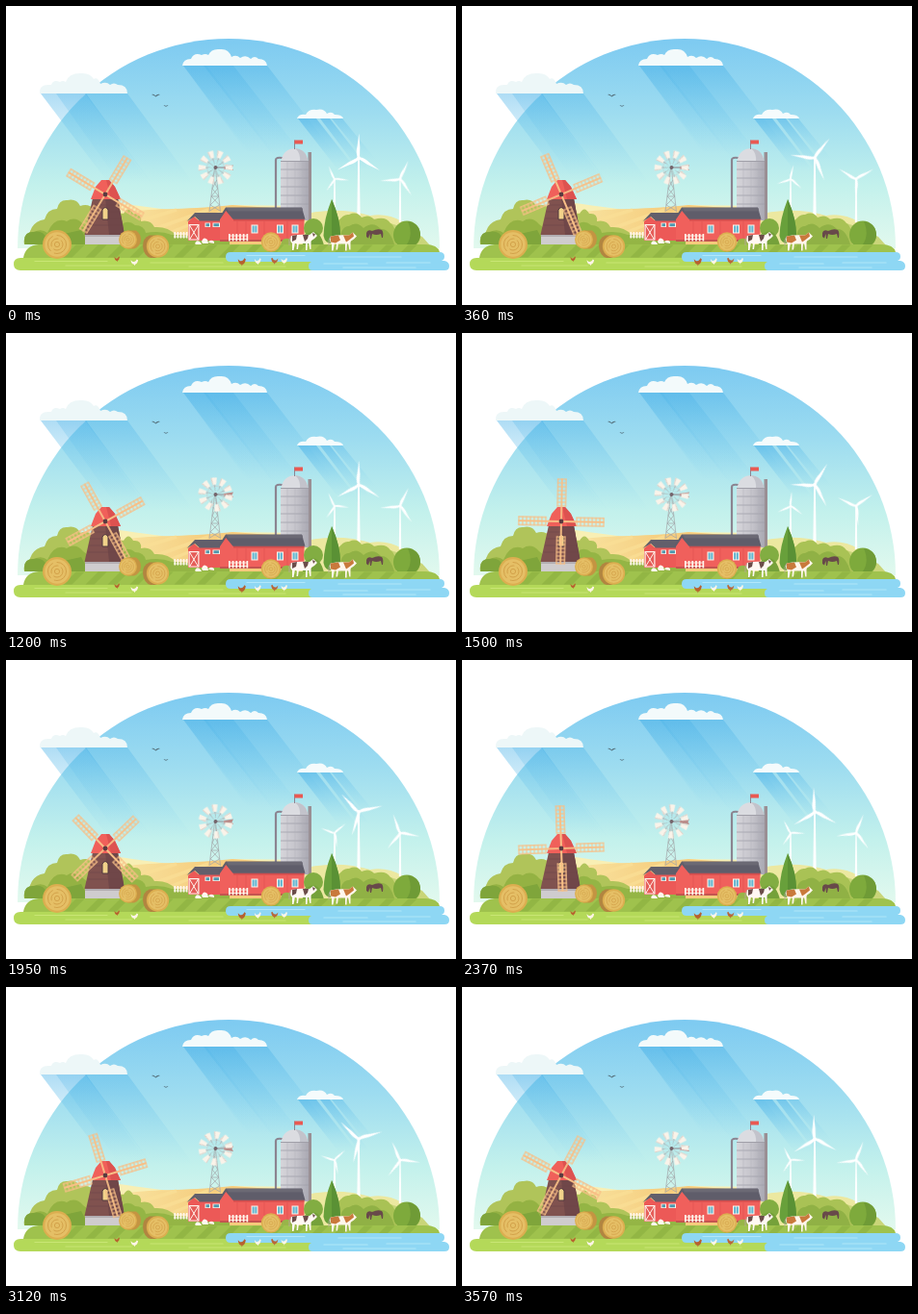
An HTML page for the animation above (3600 ms loop, 467 by 311 pixels).

```html
<!DOCTYPE html>
<html lang="en">
<head>
<meta charset="utf-8">
<title>Farm</title>
<style>
  html, body { margin: 0; width: 100%; height: 100%; overflow: hidden; background: #fff; }
  svg { display: block; width: 100vw; height: 100vh; }
  .spin { transform-origin: 0 0; animation: spin 3.6s linear infinite; }
  @keyframes spin { to { transform: rotate(360deg); } }
</style>
</head>
<body>
<svg viewBox="0 0 467 311">
  <defs>
    <linearGradient id="sky" x2="0" y2="1">
      <stop offset="0" stop-color="#7dcaf1"/>
      <stop offset=".35" stop-color="#9ddcf0"/>
      <stop offset=".7" stop-color="#c3f1ec"/>
      <stop offset="1" stop-color="#e2f9ee"/>
    </linearGradient>
    <linearGradient id="ray" x2="0" y2="1">
      <stop offset="0" stop-color="#4db3e8" stop-opacity=".6"/>
      <stop offset="1" stop-color="#7fd0ee" stop-opacity="0"/>
    </linearGradient>
    <linearGradient id="field" x2="1">
      <stop offset="0" stop-color="#f8e3a0"/>
      <stop offset=".5" stop-color="#f6ce7f"/>
      <stop offset="1" stop-color="#f4c677"/>
    </linearGradient>
    <linearGradient id="steel" x2="1">
      <stop offset="0" stop-color="#d6d5da"/>
      <stop offset=".55" stop-color="#c5c4cb"/>
      <stop offset="1" stop-color="#a9a8b2"/>
    </linearGradient>

    <g id="sail" fill="none" stroke="#f8bf86">
      <path d="M0 0V-44.500" stroke-width="1.800"/>
      <path d="M-4.200 -15.500V-44.500M4.200 -15.500V-44.500" stroke-width="1.200"/>
      <path d="M0 -15.500V-44.600" stroke-width="9.400" stroke-dasharray="1.100 2.900"/>
    </g>
    <path id="blade" d="M-.9 0C-2.800 -4 -2.500 -8 -1.500 -12L.3 -25.500L1.300 -11L1 0Z"/>
    <g id="rotor">
      <use href="#blade"/>
      <use href="#blade" transform="rotate(120)"/>
      <use href="#blade" transform="rotate(240)"/>
      <circle r="1.9"/>
    </g>
    <g id="bale">
      <circle r="15" fill="#dcae50"/>
      <circle r="12.800" fill="#e5bf66"/>
      <g fill="none" stroke="#d3a24a">
        <circle r="9.500" stroke-dasharray="18 4"/>
        <circle r="6" stroke-dasharray="13 3"/>
        <circle r="2.600"/>
      </g>
    </g>
    <g id="cow">
      <path d="M-11 -5Q-3 -7 8 -6L12 -9L16 -5L13 -2L10 0L9 3H-10Q-13 0 -11 -5Z"/>
      <path d="M-10 2H-7L-8.500 10H-10ZM-5 2H-3L-4 9H-5.500ZM4 2H6L5.500 10H4ZM7 2H9.500L9.500 9H8.300Z"/>
      <path d="M-11 -5Q-14 -2 -13 5" fill="none" stroke="#b9a8a0" stroke-width=".8"/>
    </g>
    <path id="hen" d="M-4 -3L-2 -1Q0 0 2 -2L3 -4L4.500 -3Q4 2 1 3L.5 4.500H0V3Q-3 3 -4 -3Z"/>
    <g id="window">
      <path d="M-3.500 -4.500H3.500V4.500H-3.500Z" fill="#fff3e8"/>
      <path d="M-2.400 -3.400H-.3V3.400H-2.400ZM.3 -3.400H2.400V3.400H.3Z" fill="#62b6d2"/>
    </g>
  </defs>

  <path d="M12 252A219 218 0 0 1 450 252Z" fill="url(#sky)"/>

  <!-- shade below the clouds -->
  <g fill="url(#ray)">
    <path d="M36 91H83L152 185H107Z" opacity=".75"/>
    <path d="M82 91H126L195 185H151Z" opacity=".6"/>
    <path d="M52 91H83L145 180H115Z" opacity=".45"/>
    <path d="M184 62H271L340 152H250Z" opacity=".75"/>
    <path d="M205 62H236L312 160H281Z" opacity=".7"/>
    <path d="M184 62H208L280 155H255Z" opacity=".4"/>
    <path d="M303 117H322L364 171H345Z"/>
    <path d="M326 117H336L377 170H366Z" opacity=".9"/>
    <path d="M338 117H349L384 160H373Z" opacity=".6"/>
  </g>

  <!-- clouds -->
  <path d="M35 91Q34 82 44 82H47Q49 76 56 79Q59 77 62 79Q65 70 77 70Q87 69 91 76Q95 73 98 81Q104 78 108 82Q112 79 116 82Q126 82 126 91Z" fill="#edf7f8"/>
  <path d="M183 62Q184 55 192 55Q195 48 203 51Q207 49 210 51Q213 44 222 45Q231 44 234 53Q239 50 243 54Q249 50 254 55Q258 51 262 55Q270 55 271 62Z" fill="#f3fafb"/>
  <path d="M302 117Q304 112 311 113Q314 107 322 108Q330 106 333 112Q338 109 341 113Q349 113 350 117Z" fill="#f5fbfc"/>
  <path d="M151 92Q154 91 155 93.500Q157 91 160 92Q157 93 155.500 94.500Q154 93 151 92ZM163.500 103.500Q165 103 166 104Q167 103 168.500 103.500L166 104.800Z" fill="#55707c"/>

  <!-- hills -->
  <path d="M72 248V214C90 205 108 203 125 206C160 211 190 217 235 207L310 208V250H72Z" fill="#f8efb4"/>
  <path d="M118 216C150 209 180 213 235 207L300 212V250H118Z" fill="url(#field)"/>
  <path d="M140 237L210 212M152 243L222 215M128 227L177 212" stroke="#fadf96" stroke-width="3.500" opacity=".75"/>
  <path d="M300 250V219Q340 207 378 218Q410 213 434 246V250Z" fill="#ece8a0"/>
  <path d="M345 222Q380 213 432 240L440 249H340Z" fill="#c9d578"/>

  <!-- wind turbines -->
  <g fill="#fff">
    <path d="M340.300 180H341.700L342.200 213H339.800Z" opacity=".9"/>
    <path d="M365.200 158H366.800L367.600 218H364.400Z"/>
    <path d="M408.400 180H409.600L410.200 225H407.800Z"/>
    <g transform="translate(341 180) rotate(-26) scale(.59)"><use class="spin" href="#rotor"/></g>
    <g transform="translate(366 158)"><use class="spin" href="#rotor"/></g>
    <g transform="translate(409 180) rotate(24) scale(.82)"><use class="spin" href="#rotor"/></g>
  </g>

  <!-- bushes -->
  <path d="M24 248Q22 225 40 222Q43 211 53 211Q55 201 64 202Q73 200 77 208Q86 205 92 212L122 216Q127 207 132 216Q141 215 140 224Q150 222 154 230Q168 229 176 238L180 248Z" fill="#b0c45a"/>
  <path d="M19 248Q17 235 29 235Q37 231 43 236Q50 219 63 224Q72 218 80 227L90 235V248Z" fill="#94b243"/>
  <path d="M20 248Q17 235 28 235Q38 233 42 241L78 233L86 248Z" fill="#7fa53b"/>
  <path d="M118 250V229Q126 221 134 228Q143 228 145 236Q160 233 172 238L232 241V250Z" fill="#94b545"/>
  <path d="M345 248V224Q350 216 356 217Q364 213 369 220Q377 216 382 222Q394 218 399 226Q405 229 405 248Z" fill="#a9c255"/>
  <path d="M347 248Q346 229 356 229Q364 223 371 231Q381 223 389 232Q398 231 403 248Z" fill="#90b145"/>

  <!-- silo -->
  <path d="M280 223V160Q280 157 287 158" fill="none" stroke="#8b8490" stroke-width="2.200"/>
  <path d="M313.500 152H317V223H313.500Z" fill="#9a8f94"/>
  <path d="M285 162H314V223H285Z" fill="url(#steel)"/>
  <path d="M285 170H314M285 179H314M285 188H314M285 197H314M285 206H314" stroke="#a09fa9" stroke-width=".8"/>
  <path d="M292 162V212M300 162V212M308 162V212" stroke="#b1b0b9" stroke-width=".5"/>
  <path d="M285.500 162Q287 149 299.500 148Q312 149 313.500 162Z" fill="#dbdce1"/>
  <path d="M300 148Q312 149 313.500 162H305Q306 153 300 148Z" fill="#c2c3cb"/>
  <path d="M285 161.500H314" stroke="#a09fa8"/>
  <path d="M299.500 149V139.500" stroke="#8b8490"/>
  <path d="M299.500 139.500H308V143.500H299.500Z" fill="#e95952"/>

  <!-- wind pump -->
  <path d="M216.400 170L211 214M217.600 170L222.500 214M215 181L219.600 190L213 198L221.500 207L211.500 213M218.800 181L214 190L220.800 198L212 207L222 213M213 198H221" fill="none" stroke="#a3a5a8" stroke-width=".7"/>
  <path d="M217 168H228" stroke="#8f8a90"/>
  <path d="M226 167L236 165.500L234.500 168.500L236 171L226 169.500Z" fill="#b98b88"/>
  <g transform="translate(217.500 168) rotate(-11)">
    <g class="spin" fill="none">
      <circle r="9" stroke="#cfcac8" stroke-width=".6"/>
      <circle r="7" pathLength="20" stroke="#a39c9e" stroke-width="9" stroke-dasharray=".22 1.780" stroke-dashoffset="-.5"/>
      <circle r="14" pathLength="20" stroke="#faf3e9" stroke-width="7.500" stroke-dasharray="1.150 .85"/>
      <circle r="14" pathLength="20" stroke="#dcd0c8" stroke-width="7.500" stroke-dasharray=".2 1.800"/>
    </g>
    <circle r="2" fill="#75666d"/>
  </g>

  <!-- barn -->
  <path d="M189 224L195 219L201 224V244H189ZM200 223H230V244H200Z" fill="#ec5957"/>
  <path d="M187.500 224L196 215H226L222 223.500H201L196 219Z" fill="#625f6b"/>
  <path d="M189.500 227H200.500V243.500H189.500Z" fill="#fff3ec"/>
  <path d="M190.700 228.200H199.300V242.500H190.700Z" fill="#e55c58"/>
  <path d="M190.500 228L199.500 243M199.500 228L190.500 243" stroke="#fff3ec"/>
  <path d="M206.500 225.500H212V230H206.500ZM214.500 225.500H222V230H214.500Z" fill="#fff0e6"/>
  <path d="M207.500 226.300H211V229.300H207.500ZM215.500 226.300H221V229.300H215.500Z" fill="#4f98af"/>
  <path d="M222 221L228 212L236 221H309.500V244H222Z" fill="#f0605c"/>
  <path d="M236 221.500H309.500V223.500H236Z" fill="#cf4c4d"/>
  <path d="M220.500 221L228 209.500H307L310.500 221.800H235.500L228.200 213L222 222Z" fill="#5f5d6a"/>
  <path d="M229 210H307.300L308.300 213.500H231Z" fill="#6b6974"/>
  <path d="M240 224V243M249 224V243M268 224V243M292 224V243" stroke="#e05251" stroke-width=".6"/>
  <use href="#window" x="258" y="232"/>
  <use href="#window" x="284.500" y="232"/>
  <use href="#window" x="300" y="232"/>
  <path d="M222 243H310V245H222Z" fill="#c45450"/>

  <!-- trees by the barn -->
  <path d="M338 201Q347 221 347 239Q345 247 338 247Q331 247 329.500 239Q330 221 338 201Z" fill="#68a03b"/>
  <path d="M338 201Q347 221 347 239Q345 247 338 247Z" fill="#5a9135"/>
  <circle cx="319" cy="231" r="10" fill="#82ad42"/>
  <path d="M308 249Q307 236 314 236Q325 230 330 249Z" fill="#75a13a"/>
  <path d="M285 249Q286 239 296 243L303 249Z" fill="#98b549"/>
  <ellipse cx="416" cy="238" rx="14" ry="14.500" fill="#7eaa3c"/>
  <path d="M417 224Q430 226 430 239Q428 251 413 251Q424 241 417 224Z" fill="#6f9b36"/>

  <!-- ground and water -->
  <path d="M18 262Q20 249 34 248H435Q448 248 450 256V264H18Z" fill="#9fc24d"/>
  <path d="M66 255H430" stroke="#92b644" stroke-width="13" stroke-dasharray="9 14" transform="translate(255) skewX(-45)"/>
  <path d="M15 262H320V275H15Q8 275 8 268.500Q8 262 15 262Z" fill="#b4d959"/>
  <path d="M30 265.500H105M150 267H225M62 270H130M190 271H290" stroke="#c9e675" stroke-width="1.200" stroke-linecap="round"/>
  <path d="M233 256H450Q455 256 455 260.500Q455 264 452 265H455Q460 266 460 270.500Q460 275 455 275H318Q314 275 314 270.500Q314 267 317 266H233Q228 266 228 261Q228 256 233 256Z" fill="#8ed7f4"/>
  <path d="M250 259.500H310M345 261H410M330 268H375M395 267H440M350 272H425" stroke="#b2e8fa" stroke-width="1.200" stroke-linecap="round"/>

  <!-- fences -->
  <g fill="none" stroke="#fff8ee">
    <path d="M174 237H188M174 240H188" stroke-width=".8"/>
    <path d="M174.500 238.300H188.500" stroke-width="6.500" stroke-dasharray="1.500 1.600"/>
    <path d="M231 239H251M231 242.500H251" stroke-width=".8"/>
    <path d="M231 240.800H252" stroke-width="7.500" stroke-dasharray="1.700 2"/>
  </g>
  <path d="M196 247Q198 242 202 246L203 248H197ZM203 245Q205 239 209 243L210 247H204ZM210 246Q212 242 216 245V247Z" fill="#fff8ef"/>

  <!-- windmill -->
  <path d="M82 238H119.500V248H82Z" fill="#cfccce"/>
  <path d="M82 238H119.500V240H82Z" fill="#b3aeb2"/>
  <path d="M90 200H116L123 238H81.500Z" fill="#80524f"/>
  <path d="M103 200H116L123 238H107Z" fill="#704749"/>
  <path d="M89 207H117M87.500 214H118.500M86 221H119.800M84.500 228H121" stroke="#6d4547" stroke-width=".6"/>
  <path d="M99 181H107L113 188L119 201H88L93 188Z" fill="#f0605a"/>
  <path d="M104 181H107L113 188L119 201H109Z" fill="#dd5250"/>
  <path d="M100 222V212Q103 207 106 212V222Z" fill="#f2d28a" stroke="#51383f"/>
  <g transform="translate(103 196) rotate(31)">
    <g class="spin">
      <use href="#sail"/>
      <use href="#sail" transform="rotate(90)"/>
      <use href="#sail" transform="rotate(180)"/>
      <use href="#sail" transform="rotate(270)"/>
    </g>
  </g>
  <circle cx="103" cy="196" r="2.400" fill="#5a3b40"/>

  <!-- hay bales -->
  <use href="#bale" transform="translate(53 248)"/>
  <path d="M126 233.500H135Q140 237 140 243Q139 251 133 252.500H126Z" fill="#c49442"/>
  <use href="#bale" transform="translate(126.500 243) scale(.63)"/>
  <path d="M156 238.500H149Q142 241 142 250Q143 260 150 262H156Z" fill="#b28540"/>
  <use href="#bale" transform="translate(157.500 250) scale(.78)"/>
  <use href="#bale" transform="translate(275 245.500) scale(.68)"/>

  <!-- animals -->
  <g transform="translate(307 244)">
    <use href="#cow" fill="#fff8f2"/>
    <path d="M-10 -5L-5 -6L-6 -1L-10 1ZM1 -6L7 -6L6 -2L3 1ZM11 -8L14 -6.500L12 -4Z" fill="#6b4c49"/>
  </g>
  <g transform="translate(348 244.500)">
    <use href="#cow" fill="#fff6ec"/>
    <path d="M-11 -5L-3 -6L-1 -1L-6 2L-11 1ZM2 -6H8L12 -9L13 -5L8 -1L5 1Z" fill="#c9793c"/>
  </g>
  <path d="M374 236Q375 232 380 234Q386 231 390 233Q392 235 391 241H390L389 237Q384 239 380 237L379 242H378L377.500 237L376 241.500L374 240Z" fill="#68494a"/>
  <use href="#hen" transform="translate(115 263) scale(.65)" fill="#b7602e"/>
  <use href="#hen" transform="translate(133 266.500) scale(.9 .75)" fill="#fff5e8"/>
  <use href="#hen" transform="translate(244.500 266) scale(.95)" fill="#b7602e"/>
  <use href="#hen" transform="translate(261 265.500) scale(.8)" fill="#fff5e8"/>
  <use href="#hen" transform="translate(279 265) scale(-.85 .8)" fill="#b9673a"/>
  <use href="#hen" transform="translate(288.500 265) scale(.75)" fill="#fff5e8"/>
</svg>
</body>
</html>
```
